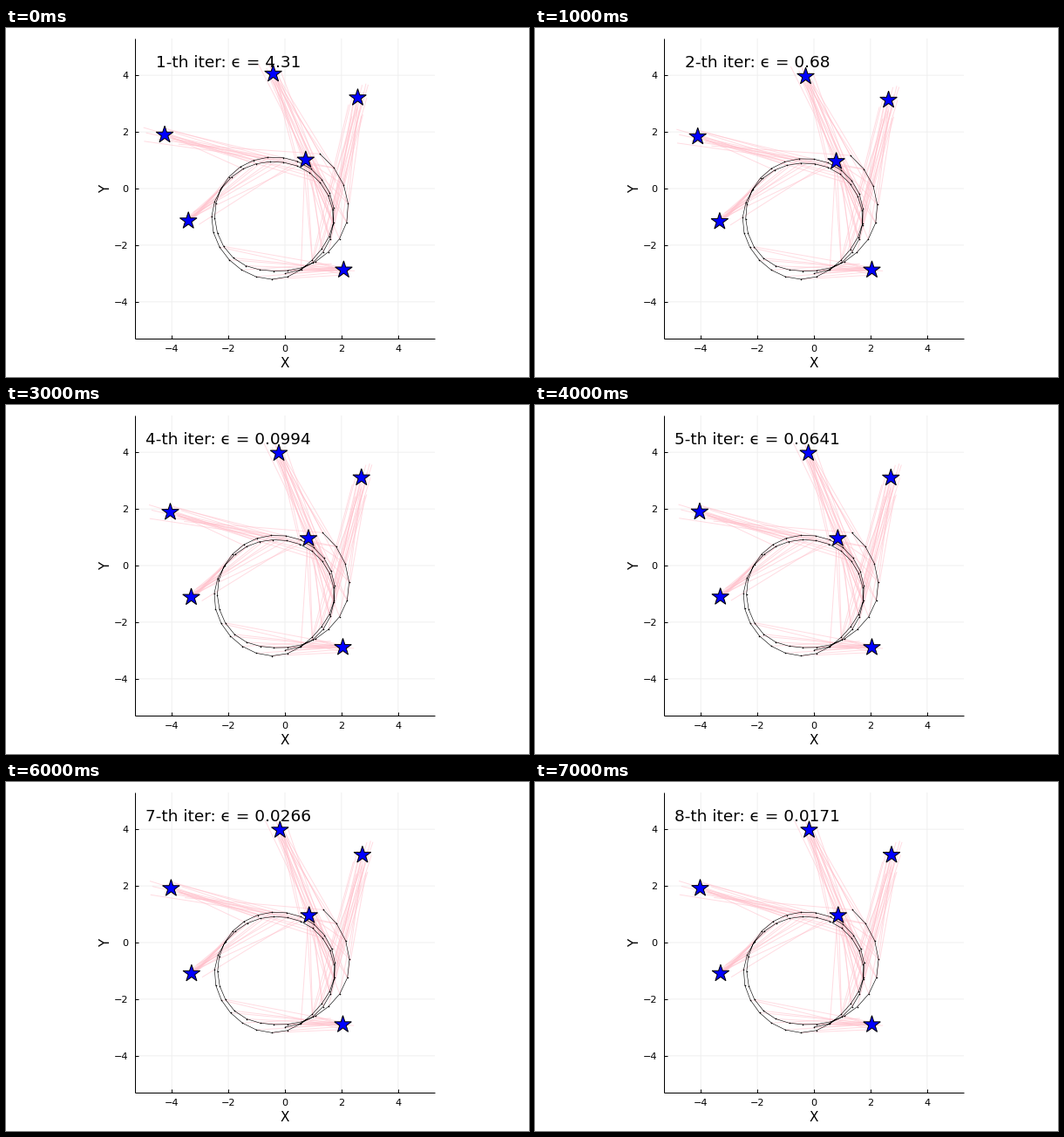
A matplotlib script that plays this animation: 600 by 400 pixels, repeating every 8 s.

```python
import numpy as np
import matplotlib.pyplot as plt
from matplotlib.animation import FuncAnimation
from matplotlib.collections import LineCollection

plt.rcParams["font.family"] = "DejaVu Sans"
W, H, DPI = 600, 400, 100
PX = 72 / DPI                      # points per pixel
CX, CY, UNIT = 320, 184, 32.45     # data origin and scale in pixels
LEFT, RIGHT, TOP, BOTTOM = 147.6, 492, 12, 355.5

EPS = ["4.31", "0.68", "0.148", "0.0994", "0.0641", "0.0413", "0.0266", "0.0171"]
DECAY = 0.643                      # error left after each iteration
TURN = 0.019                       # rotation still missing at the second iteration
POSES = 60

# converged landmarks, and the track's radius at every eighth of a turn
STARS = np.array([(314.8, 55), (409.3, 83.8), (189.7, 121.6),
                  (213, 219.3), (348, 153), (386.5, 278.1)])
RADII = [65.3, 68, 67, 64.4, 61.8, 64.8, 70.6, 71.3, 71.2, 64.7, 67.9,
         68.6, 67, 67.2, 67.1, 66.4, 62, 70, 83.6, 88.1, 87]


def smooth(knots, t):
    """Catmull-Rom curve through evenly spaced knots."""
    k = np.pad(knots, (1, 2), "edge")
    i = t.astype(int)
    f = t - i
    a, b, c, d = (k[i + j] for j in range(4))
    return b + f * (c - a + f * (2 * a - 5 * b + 4 * c - d
                                 + f * (3 * (b - c) + d - a))) / 2


def make_track():
    deg = np.linspace(-81, 772, POSES)
    r = smooth(RADII, (deg + 90) / 45)
    a = np.radians(deg)
    return np.column_stack([310 + r * np.cos(a), 216 - r * np.sin(a)])


def estimate(points, n):
    """Place converged points where iteration n puts them."""
    x, y = points.T
    turn = TURN * DECAY ** max(n - 1, 0)
    x, y = x - turn * (279 - y), y - turn * (x - 342)
    if n == 0:                     # the first guess is off by a larger jump
        up = 281 - y
        x, y = x - 0.017 * up - 0.015 * (320 - x), y - 0.013 * up
    return np.column_stack([x, y])


def observe(track):
    """Noisy sightings: pose index, star index, miss of the sighting."""
    rng = np.random.default_rng(4)
    step = np.gradient(track, axis=0)
    poses, seen, miss = [], [], []
    for i, p in enumerate(track):
        heading = np.arctan2(step[i, 1], step[i, 0])
        for j, s in enumerate(STARS):
            d = s - p
            dist = np.hypot(*d)
            angle = np.arctan2(d[1], d[0])
            off = (angle - heading + np.pi) % (2 * np.pi) - np.pi
            if abs(off) > np.radians(56) or not 0.5 < dist / UNIT < 6:
                continue
            noise = np.clip(rng.normal(size=2), -2, 2)
            r = dist * (1 + 0.07 * noise[0])
            a = angle + np.pi / 90 * noise[1]
            poses.append(i)
            seen.append(j)
            miss.append(p + r * np.array([np.cos(a), np.sin(a)]) - s)
    return poses, seen, np.array(miss)


TRACK = make_track()
POSE, SEEN, MISS = observe(TRACK)

fig = plt.figure(figsize=(W / DPI, H / DPI), dpi=DPI, facecolor="white")
ax = fig.add_axes([0, 0, 1, 1])
ax.set_xlim(0, W)
ax.set_ylim(H, 0)
ax.axis("off")


def line(x, y, color="black", z=6, snap=True):
    ax.plot(x, y, color=color, lw=PX, zorder=z, snap=snap, solid_capstyle="butt")


def label(x, y, s, size, ha="center", va="baseline", **kw):
    return ax.text(x, y, s, fontsize=size * PX, ha=ha, va=va, zorder=8, **kw)


for v in range(-4, 5, 2):
    x, y = CX + v * UNIT, CY - v * UNIT
    line([x, x], [TOP, BOTTOM], "#f0f0f0", z=0, snap=False)
    line([LEFT, RIGHT], [y, y], "#f0f0f0", z=0, snap=False)
    line([x, x], [BOTTOM, BOTTOM - 4])
    line([LEFT, LEFT + 4], [y, y])
    name = str(v).replace("-", "\u2212")
    label(x, 371, name, 11.3)
    label(140.5, y + 4.2, name, 11.3, ha="right")
line([LEFT, LEFT], [TOP, BOTTOM + 0.5])
line([LEFT, RIGHT], [BOTTOM, BOTTOM])
label(320, 389, "X", 15.3)
label(114.6, 184, "Y", 15.3, va="center", rotation=90)

rays = LineCollection([], colors="pink", linewidths=PX, alpha=0.55, zorder=2)
ax.add_collection(rays)
track, = ax.plot([], [], color="black", lw=0.6 * PX, marker="o", ms=1.6 * PX,
                 mew=0, zorder=3)

tip = -np.pi / 2 + np.arange(10) * np.pi / 5
radius = np.where(np.arange(10) % 2 == 0, 10.3, 10.3 * 0.382)
SHAPE = np.column_stack([radius * np.cos(tip), radius * np.sin(tip)])
marks = [ax.add_patch(plt.Polygon(SHAPE, closed=True, fc="blue", ec="black",
                                  lw=PX, zorder=5)) for _ in STARS]
title = label(255, 45.3, "", 18.5)


def draw(n):
    path, stars = estimate(TRACK, n), estimate(STARS, n)
    rays.set_segments(np.stack([path[POSE], stars[SEEN] + MISS], axis=1))
    track.set_data(path[:, 0], path[:, 1])
    for mark, s in zip(marks, stars):
        mark.set_xy(SHAPE + s)
    title.set_text(f"{n + 1}-th iter: \u03f5 = {EPS[n]}")
    return [rays, track, title, *marks]


anim = FuncAnimation(fig, draw, frames=8, interval=1000, repeat=True,
                     repeat_delay=0, blit=False)
plt.show()
```
